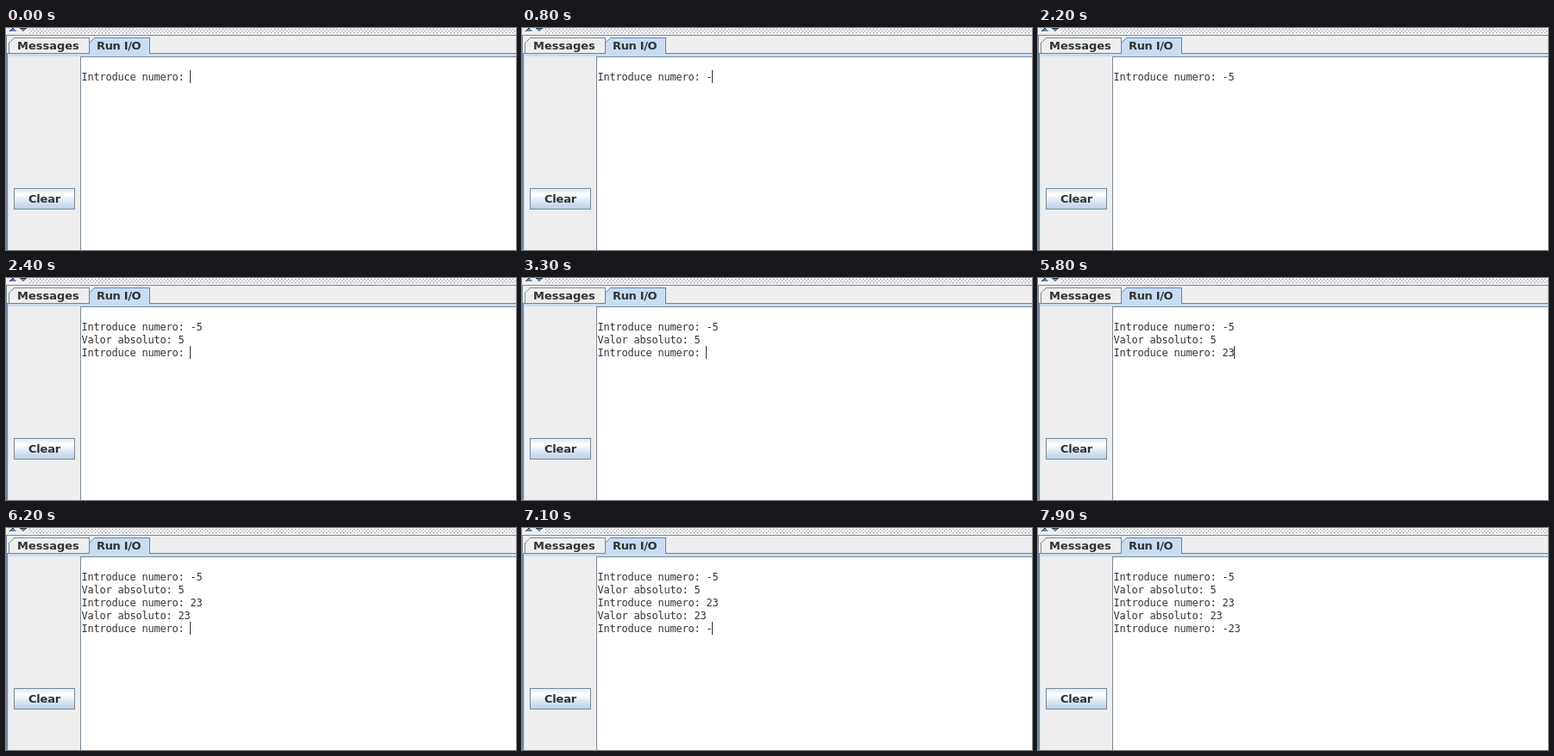
Animation of 591 by 258 pixels, one loop 8000 ms. Source, as an HTML page:

```html
<!DOCTYPE html>
<html lang="es">
<head>
<meta charset="utf-8">
<style>
html, body { margin: 0; width: 100%; height: 100%; overflow: hidden; background: #eee; }
svg { display: block; }
.shape { shape-rendering: crispEdges; }
text { fill: #333; white-space: pre; }
.label { font: bold 13px "DejaVu Sans", sans-serif; }
.console { font: 12px "DejaVu Sans Mono", monospace; letter-spacing: -0.224px; }
</style>
</head>
<body>
<svg width="591" height="258" viewBox="0 0 591 258">
  <defs>
    <pattern id="bumps" x="26" y="0" width="4" height="4" patternUnits="userSpaceOnUse">
      <path fill="#fff" d="M0 0h1v1h-1zM2 2h1v1h-1z"/>
      <path fill="#7a8a99" d="M1 1h1v1h-1zM3 3h1v1h-1z"/>
    </pattern>
    <linearGradient id="face" x2="0" y2="1">
      <stop stop-color="#dde8f3"/>
      <stop offset=".3" stop-color="#fff"/>
      <stop offset=".6" stop-color="#dde8f3"/>
      <stop offset="1" stop-color="#b8cfe5"/>
    </linearGradient>
  </defs>
  <g class="shape">
    <rect width="591" height="258" fill="#eee"/>
    <rect x="26" width="565" height="6" fill="url(#bumps)"/>
    <!-- Divider arrows: body, dark edge, highlight -->
    <path fill="#6382bf" d="M7 1h3v1h1v1h1v1H5V3h1V2h1zM17 1h6v1h-1v1h-1v1h-2V3h-1V2h-1z"/>
    <path fill="#333" d="M7 0h2v1H7v1H6v1H5v1H4V3h1V2h1V1h1zM16 0h8v1h-8z"/>
    <path fill="#fff" d="M5 4h8v1H5zM23 1h1v1h-1v1h-1v1h-1v1h-1V4h1V3h1V2h1z"/>
    <path fill="#7a8a99" d="M0 8h591v1H1v249H0z"/>
    <path fill="#c8ddf2" d="M2 30h589v3H3v225H2z"/>
    <path fill="#6382bf" d="M1 29h590v1H2v228H1z"/>
    <path fill="#eee" stroke="#7a8a99" d="M3.5 29V17.5l6-6h87V29"/>
    <path fill="#c8ddf2" stroke="#6382bf" d="M96.5 29V17.5l6-6h64V29"/>
    <path fill="#c8ddf2" d="M97 29h69v1H97z"/>
    <path fill="#fff" d="M87 34h504v224H87z"/>
    <path fill="#7a8a99" d="M86 33h505v1H87v224h-1z"/>
    <rect x="9.5" y="186.5" width="70" height="24" fill="url(#face)" stroke="#7a8a99"/>
  </g>
  <g class="label">
    <text x="13" y="25">Messages</text>
    <text x="105" y="25" letter-spacing="-.35">Run I/O</text>
    <text x="26" y="203" letter-spacing="-.2">Clear</text>
  </g>
  <g id="console" class="console"></g>
  <rect id="caret" class="shape" width="1" height="15" fill="#333"/>
</svg>
<script>
const DURATION = 8000, LEFT = 87, TOP = 49, CHAR = 7, LINE = 15;
const ask = "Introduce numero: ", answer = "Valor absoluto: ";
const first = ask + "-5";
const second = `${first}\n${answer}5\n${ask}`;
const third = `${second}23\n${answer}23\n${ask}`;

// [start time, console text]
const typing = [
  [0, ask], [800, ask + "-"], [1600, first], [2300, first + "\n"],
  [2400, second], [5700, second + "2"], [5800, second + "23"],
  [6200, third], [7100, third + "-"], [7300, third + "-2"], [7400, third + "-23"]
];
// The caret starts visible and flips at each time.
const blinks = [500, 700, 1400, 1600, 2200, 2300, 2900, 3300, 4000, 4400, 4900, 5400, 6900, 7100, 7900];

const consoleGroup = document.getElementById("console");
const caret = document.getElementById("caret");
const rows = Array.from({ length: 5 }, (_, i) => {
  const row = document.createElementNS("http://www.w3.org/2000/svg", "text");
  row.setAttribute("x", LEFT + 0.4);
  row.setAttribute("y", TOP + 12 + i * LINE);
  return consoleGroup.appendChild(row);
});

function draw(time) {
  const content = typing.filter(([start]) => start <= time).pop()[1];
  const lines = content.split("\n");
  rows.forEach((row, i) => {
    const value = lines[i] || "";
    if (row.textContent !== value) row.textContent = value;
  });
  const flips = blinks.filter(start => start <= time).length;
  const last = lines.length - 1;
  caret.setAttribute("x", LEFT + lines[last].length * CHAR);
  caret.setAttribute("y", TOP + last * LINE);
  caret.setAttribute("visibility", flips % 2 ? "hidden" : "visible");
}

const begin = performance.now();
function tick() {
  draw((performance.now() - begin) % DURATION);
  requestAnimationFrame(tick);
}
tick();
</script>
</body>
</html>
```
